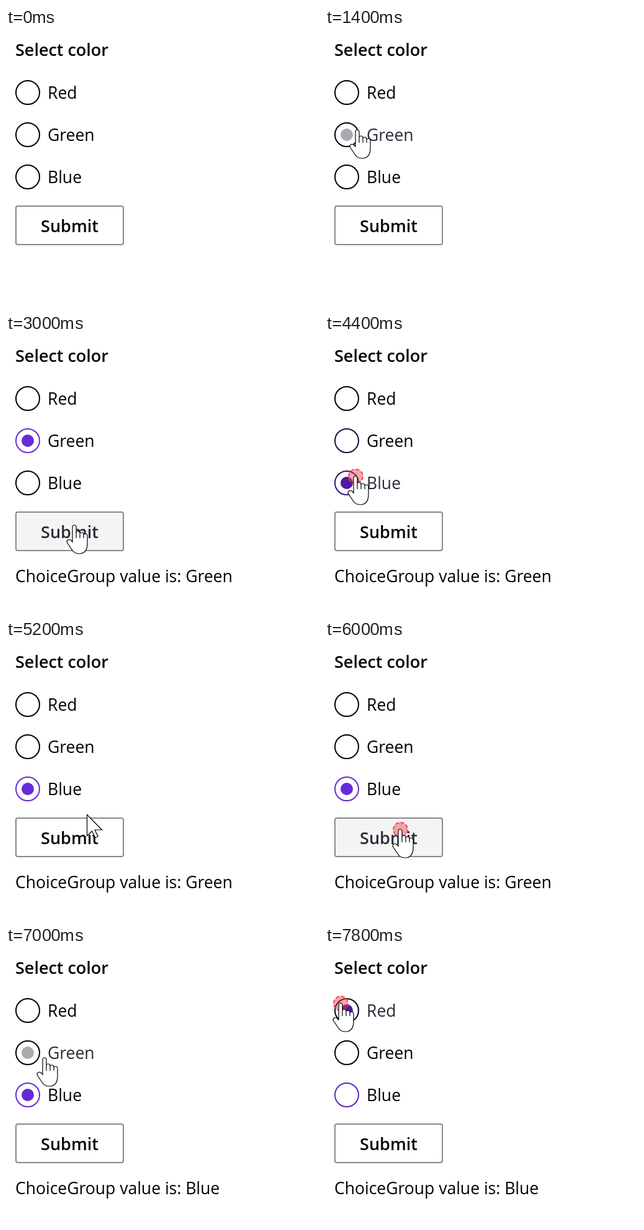
Recreate the animation shown at these times as an HTML page. Size 504 by 448 pixels, loop 8000 ms.

```html
<!DOCTYPE html>
<html lang="en">
<head>
<meta charset="utf-8">
<title>Select color</title>
<style>
  html, body { margin: 0; height: 100%; overflow: hidden; background: #fff; }
  svg { display: block; width: 504px; height: 448px; font: 26.5px "Open Sans", "Noto Sans", sans-serif; }
  .bold { font-size: 27px; font-weight: 600; }
</style>
</head>
<body>
<svg id="stage" viewBox="0 0 504 448"></svg>
<script>
const LOOP = 8000, STEP = 200;
const BLACK = [0, 0, 0], PURPLE = [104, 41, 216], DEEP = [78, 27, 163];
const HOVER_TEXT = '#2b2a38';
const options = [
  { name: 'Red', y: 104, right: 114 },
  { name: 'Green', y: 172, right: 142 },
  { name: 'Blue', y: 240, right: 121 },
];

// Pointer stops: time, x, y
const stops = [
  [600, 0, 36], [800, 14, 62], [1000, 32, 106], [1200, 48, 155], [1400, 52, 164],
  [1600, 50, 166], [2200, 110, 308], [3800, 76, 265], [4000, 49, 229],
  [4800, 108, 238], [5000, 146, 259], [5200, 130, 281], [5400, 121, 300],
  [5600, 121, 305], [6800, 107, 282], [7000, 62, 180], [7200, 25, 92],
];
// blend: how far the ring colours have faded in the step of the click
const clicks = [
  { at: 1800, pick: 1, blend: 0.5 },
  { at: 2600 },
  { at: 4400, pick: 2, blend: 0.7 },
  { at: 6000 },
  { at: 7800, pick: 0, blend: 0.1 },
];

const HAND = `<path d="M-3 27V3a3 3 0 0 1 6 0V12q0-2 3-2t3 3v1q0-2 3-2t3 3v1q0-2 3-2t3 4V29
  C21 39 17 46 8 46C1 46-2 43-5 38L-11 29C-14 25-9 22-6 24Z M3 12V21M9 13V21M15 15V21"/>`;
const ARROW = '<path d="M.5 .5V34.5L8.5 27 13.5 37.5 18 35.5 13 25H24.5Z"/>';

const mix = (a, b, k) => `rgb(${a.map((v, i) => Math.round(v + (b[i] - v) * k))})`;
const text = (x, y, str, attrs = '') => `<text x="${x}" y="${y}" ${attrs}>${str}</text>`;

function radio(i, hovered, picked, previous, blend) {
  const { name, y } = options[i];
  const on = i === picked;
  const active = hovered ? DEEP : PURPLE;
  const ring = on ? mix(BLACK, active, blend)
    : i === previous ? mix(PURPLE, BLACK, blend) : '#000';
  const dot = on ? mix(active, active, 0) : hovered ? '#aba8b2' : 'none';
  return `<circle cx="35" cy="${y}" r="19" fill="none" stroke="${ring}" stroke-width="2"/>
    <circle cx="35" cy="${y}" r="10" fill="${dot}"/>`
    + text(67, y + 10, name, `fill="${hovered ? HOVER_TEXT : '#000'}"`);
}

function ripple(x, y, age) {
  if (age >= 2 * STEP) return '';
  const [r, alpha] = age < STEP ? [11.5, 1] : [18, 0.3];
  return `<circle cx="${x + 0.5}" cy="${y + 0.5}" r="${r}" opacity="${alpha}"
    fill="rgba(240,60,70,.45)" stroke="rgba(235,60,70,.9)" stroke-width="2" stroke-dasharray="6 3"/>`;
}

function scene(t) {
  const stop = stops.findLast(s => s[0] <= t);
  const [, x, y] = stop || [0, -99, -99];
  const onOption = options.findIndex(o => x >= 15 && x <= o.right && Math.abs(y - o.y) <= 20);
  const onButton = x >= 15 && x <= 190 && y >= 286 && y <= 350;

  let picked = -1, previous = -1, blend = 1, value = '', age = Infinity;
  for (const c of clicks) {
    if (c.at > t) break;
    age = t - c.at;
    if (c.pick !== undefined) {
      previous = picked;
      picked = c.pick;
      blend = age < STEP ? c.blend : 1;
    } else if (age >= STEP) value = options[picked].name;
  }

  return text(15, 45, 'Select color', 'class="bold"')
    + options.map((o, i) => radio(i, i === onOption, picked, previous, blend)).join('')
    + `<rect x="16" y="287" width="173" height="62" rx="3" stroke="#8a8888" stroke-width="2"
        fill="${onButton ? '#f4f4f4' : '#fff'}"/>`
    + text(102.5, 329, 'Submit', `class="bold" text-anchor="middle" fill="${onButton ? HOVER_TEXT : '#000'}"`)
    + (value && text(15, 400, `ChoiceGroup value is: ${value}`))
    + ripple(x, y, age)
    + (stop ? `<g transform="translate(${x} ${y})" fill="#fff" stroke="#000" stroke-width="1.2">
        ${onOption >= 0 || onButton ? HAND : ARROW}</g>` : '');
}

const stage = document.getElementById('stage');
const start = performance.now();
let shown = -1;
function frame() {
  const t = Math.floor((performance.now() - start) % LOOP / STEP) * STEP;
  if (t !== shown) stage.innerHTML = scene(shown = t);
  requestAnimationFrame(frame);
}
frame();
</script>
</body>
</html>
```
